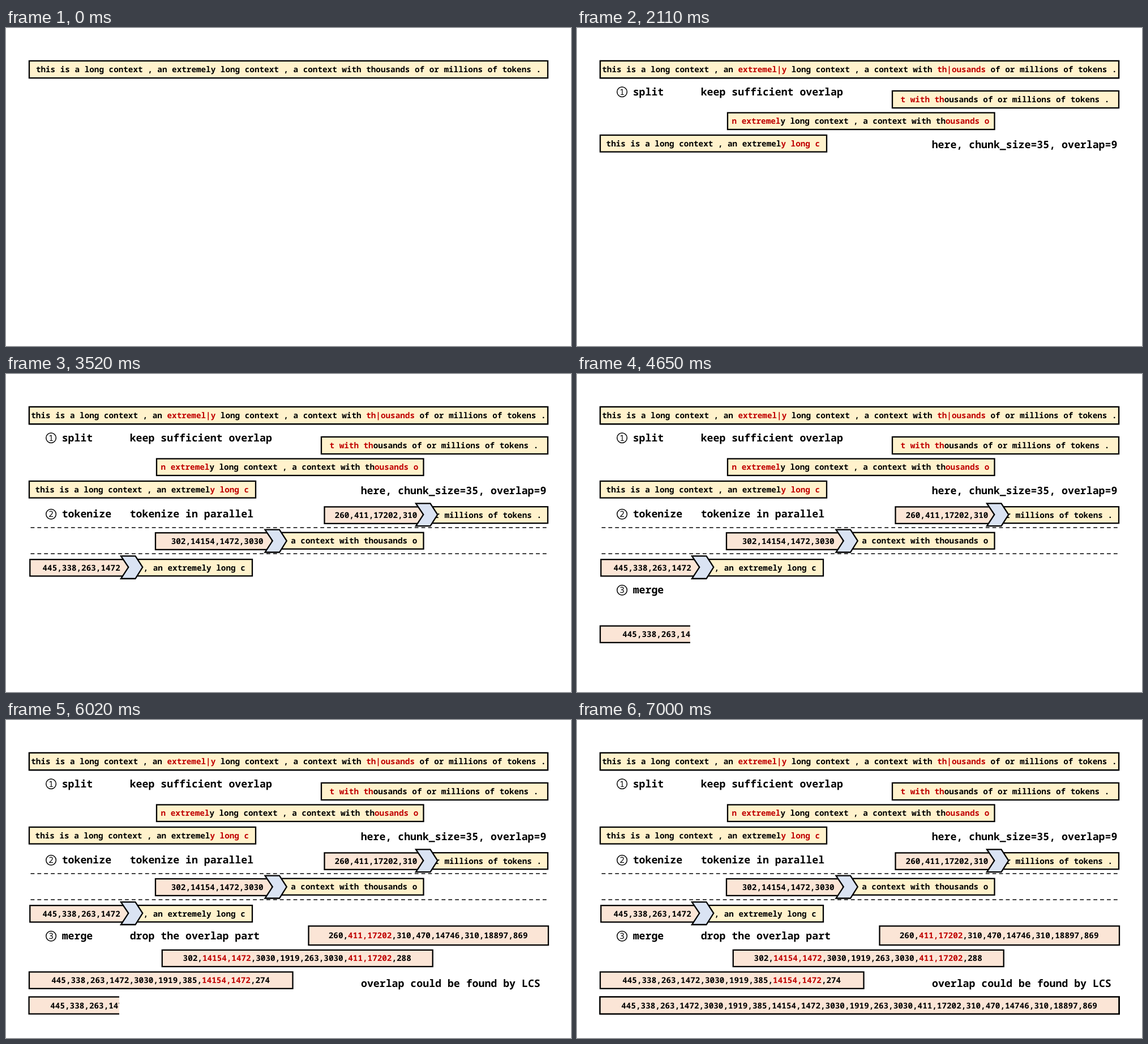
Write an HTML page that moves like this. It is 998 px wide and 561 px high and loops after 8.13 s.

```html
<!DOCTYPE html>
<html lang="en">
<head>
<meta charset="utf-8">
<title>Split, tokenize, merge</title>
<style>
  html, body { margin: 0; width: 100%; height: 100%; overflow: hidden; background: #fff; }
  svg { display: block; width: 998px; height: 561px; }
  text {
    font-family: "Noto Sans Mono", "DejaVu Sans Mono", monospace;
    font-size: 14.3px; font-weight: 600; white-space: pre;
    text-rendering: geometricPrecision; font-variant-ligatures: none;
  }
  .head { font-size: 18.22px; font-weight: 700; }
  .num { font-size: 14.5px; font-weight: 500; text-anchor: middle; }
  .red { fill: #c00000; }
  .box, .arrow { stroke: #000; stroke-width: 2.3; }
  .arrow { fill: #dae3f3; }
  .ring { fill: none; stroke: #000; stroke-width: 1.5; }
  .dash { stroke: #000; stroke-width: 1.7; stroke-dasharray: 6.8 5.1; }
</style>
</head>
<body>
<svg id="stage" viewBox="0 0 998 561"></svg>
<script>
const W = 998, H = 561, LOOP = 8130, STEP = 40;
const CREAM = "#fff2cc", PINK = "#fbe5d6";

// Text between asterisks is red.
const label = (x, y, str, cls = "") =>
  `<text x="${x}" y="${y}" class="${cls}">` +
  str.split("*").map((s, i) => i % 2 ? `<tspan class="red">${s}</tspan>` : s).join("") +
  "</text>";

const rect = (x0, y0, x1, y1, fill) =>
  `<rect class="box" x="${x0}" y="${y0}" width="${x1 - x0}" height="${y1 - y0}" fill="${fill}"/>`;

const strip = (x0, y0, x1, y1, fill, textX, str) =>
  rect(x0, y0, x1, y1, fill) + label(textX, (y0 + y1) / 2 + 5, str);

const head = (x, y, str) => label(x, y, str, "head");

const title = (n, y, name, note) =>
  `<circle class="ring" cx="79.6" cy="${y - 5.7}" r="8.8"/>` +
  label(79.6, y - 0.6, String(n), "num") + head(98.7, y, name) + head(218.7, y, note);

const arrow = (dx, dy) =>
  `<path class="arrow" transform="translate(${dx} ${dy})" ` +
  `d="M724 228.3H749.5L762.3 248L749.5 268.2H724L737.3 248Z"/>`;

const dashes = y => `<line class="dash" x1="43.5" x2="957" y1="${y}" y2="${y}"/>`;

const context = (x, str) => strip(41, 58, 957, 88.2, CREAM, x, str);

const merged = (mark, extra = "") =>
  strip(40.6, 488.5, 957.5, 518.5, PINK, 78.3,
    `445,338,263,1472,3030,1919,385,${mark}14154,1472${mark},3030,1919,263,3030,` +
    `${mark}411,17202${mark},310,470,14746,310,18897,869`) + extra;

const layers = [
  { at: 1130, art:
    context(44.3, "this is a long context , an *extremel|y* long context , a context with " +
      "*th|ousands* of or millions of tokens .") +
    title(1, 118.5, "split", "keep sufficient overlap") +
    head(626.7, 212, "here, chunk_size=35, overlap=9") },

  { at: 1910, art:
    strip(557, 111, 957, 141, CREAM, 571.5, "*t with th*ousands of or millions of tokens .") +
    strip(266, 149.5, 737.5, 179, CREAM, 273.6,
      "*n extremel*y long context , a context with th*ousands o*") +
    strip(41, 189, 441, 218.5, CREAM, 51.6, "this is a long context , an extremel*y long c*") },

  { at: 3320, art:
    title(2, 253, "tokenize", "tokenize in parallel") +
    dashes(271) + dashes(317) +
    strip(730, 234.2, 957, 263.2, CREAM, 757.3, "r millions of tokens .") +
    strip(562.5, 234.4, 737, 263.8, PINK, 580.6, "260,411,17202,310") +
    arrow(0, 0) +
    strip(465, 279.7, 737.5, 308.7, CREAM, 503.2, "a context with thousands o") +
    strip(264, 280.2, 470, 309.8, PINK, 291.7, "302,14154,1472,3030") +
    arrow(-266.5, 46.3) +
    strip(215, 327, 435, 356.3, CREAM, 242.6, ", an extremely long c") +
    strip(42.3, 327.2, 216, 356.5, PINK, 64.5, "445,338,263,1472") +
    arrow(-521, 92.8) },

  { at: 4650, art:
    title(3, 387, "merge", "drop the overlap part") +
    strip(534.5, 363.5, 958, 397, PINK, 569.8, "260,*411,17202*,310,470,14746,310,18897,869") +
    strip(275.8, 405.8, 753.7, 435, PINK, 312.6,
      "302,*14154,1472*,3030,1919,263,3030,*411,17202*,288") +
    strip(41, 444.5, 506.5, 473.8, PINK, 80.2,
      "445,338,263,1472,3030,1919,385,*14154,1472*,274") +
    head(627, 471, "overlap could be found by LCS") },

  { at: 6020, art: merged("*") },

  { at: 6760, art: merged("",
    `<path d="M957.7 487.4V519.6" stroke="#000" stroke-width="2.6"/>`) }
];

const stage = document.getElementById("stage");
stage.innerHTML =
  context(52.9, "this is a long context , an extremely long context , a context with " +
    "thousands of or millions of tokens .") +
  layers.map((layer, i) =>
    `<clipPath id="wipe${i}"><rect width="0" height="${H}"/></clipPath>` +
    `<g clip-path="url(#wipe${i})">${layer.art}</g>`).join("");

const wipes = layers.map((_, i) => stage.querySelector(`#wipe${i} rect`));

// Each layer is wiped in from the left, one step per 40 ms.
const edge = age => age < 0 ? 0 : Math.min(W, 200 + 160 * Math.floor(age / STEP));

const start = performance.now();
function draw() {
  const t = (performance.now() - start) % LOOP;
  layers.forEach((layer, i) => wipes[i].setAttribute("width", edge(t - layer.at)));
  requestAnimationFrame(draw);
}
draw();
</script>
</body>
</html>
```
